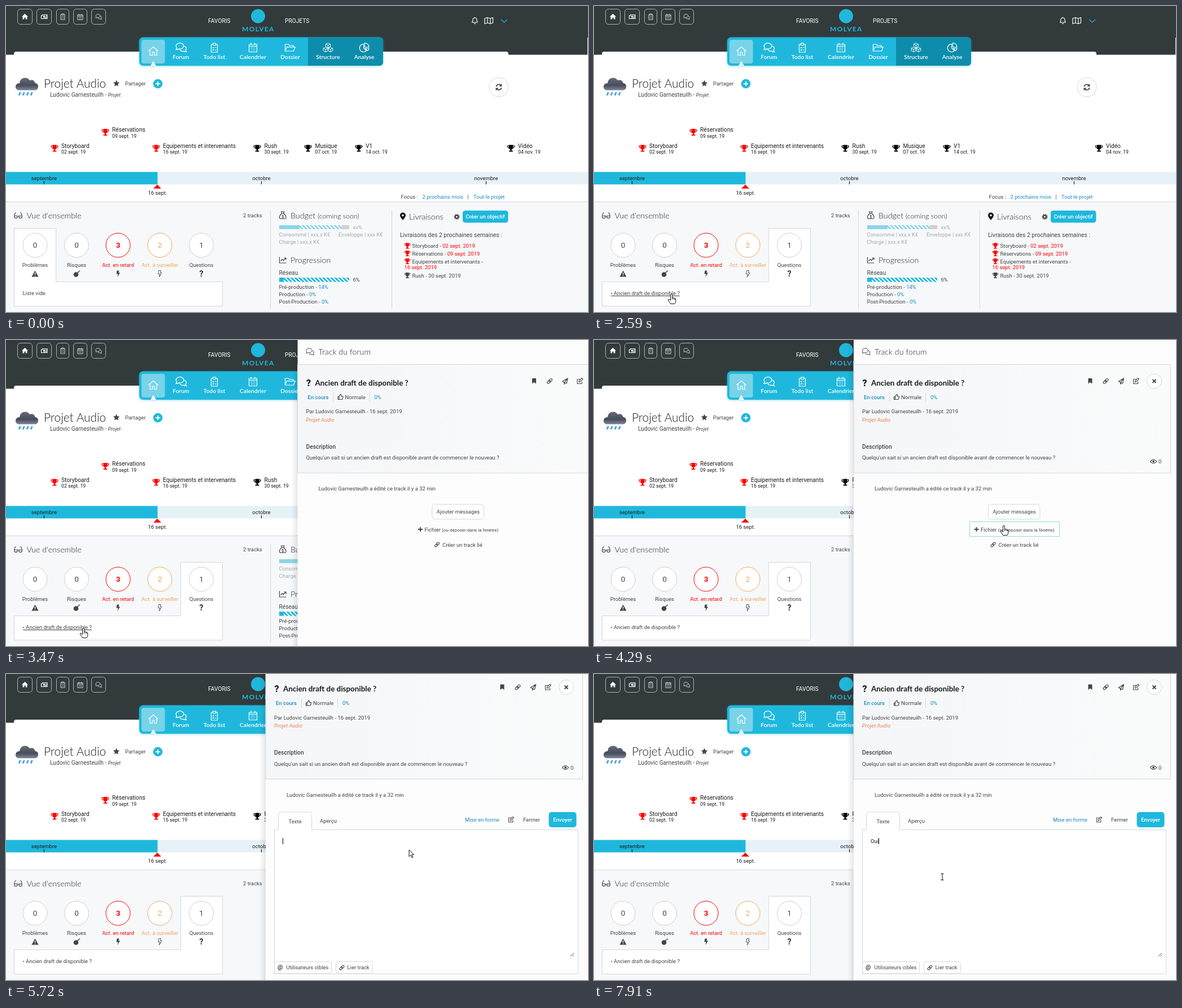
An HTML page that plays this animation: 1031 by 543 pixels, repeating every 8 s.

```html
<!DOCTYPE html>
<html lang="fr">
<head>
<meta charset="utf-8">
<title>Tableau de bord</title>
<style>
html, body { margin: 0; width: 100%; height: 100%; overflow: hidden; background: #fff; }
svg { display: block; }
.stage { font: 9.5px Roboto, sans-serif; fill: #444; color: #444; white-space: pre; }
.l { font-size: 10.2px; }
.s { font-size: 8.75px; }
.q { font: 300 14.3px Lato, sans-serif; fill: #222; }
.nav { font: 600 10.3px Lato, sans-serif; fill: #fff; color: #fff; text-anchor: middle; }
.m { text-anchor: middle; }
.med { font-weight: 500; }
.k { fill: #1c1c1c; color: #000; }
.b { fill: #1b8bbd; }
.c { fill: #1fb8dc; }
.r { fill: #f00; color: #f00; }
.o { fill: #f4a55a; color: #f4a55a; }
.g { fill: #aaa; }
.w { fill: #fff; color: #fff; }
.i { fill: none; stroke: currentColor; stroke-width: 1.2; stroke-linejoin: round; }
.f { fill: currentColor; stroke: none; }
.line { fill: none; stroke: #d3d8db; }
.white { fill: #fff; stroke: #d3d8db; }
.hover { fill: none; stroke: #8fd8ea; }
.menu { filter: drop-shadow(0 1px 2px rgba(31, 184, 220, .45)); }

/* visibility switches; positions in percent of the 8 s loop */
.v { animation: 8s step-end infinite; }
@keyframes tabA { 0% { visibility: visible } 18.75%, 100% { visibility: hidden } }
@keyframes tabB { 0% { visibility: hidden } 18.75%, 100% { visibility: visible } }
@keyframes ring { 0% { visibility: hidden } 12.75% { visibility: visible } 23.1%, 100% { visibility: hidden } }
@keyframes under { 0% { visibility: hidden } 30.25% { visibility: visible } 44%, 100% { visibility: hidden } }
@keyframes file { 0% { visibility: hidden } 51.6% { visibility: visible } 59%, 100% { visibility: hidden } }
@keyframes add { 0% { visibility: hidden } 60% { visibility: visible } 66.5%, 100% { visibility: hidden } }
@keyframes actions { 0% { visibility: visible } 66.5%, 100% { visibility: hidden } }
@keyframes editor { 0% { visibility: hidden } 66.5%, 100% { visibility: visible } }
@keyframes caret {
  0% { visibility: hidden; transform: none }
  66.5% { visibility: visible }
  73.5% { visibility: hidden }
  79.25% { visibility: visible }
  85.85% { visibility: hidden; transform: none }
  91.1% { visibility: visible; transform: translateX(7px) }
  96.85% { visibility: visible; transform: translateX(12px) }
  98.85%, 100% { visibility: visible; transform: translateX(14px) }
}
@keyframes key1 { 0% { visibility: hidden } 91.1%, 100% { visibility: visible } }
@keyframes key2 { 0% { visibility: hidden } 96.85%, 100% { visibility: visible } }
@keyframes key3 { 0% { visibility: hidden } 98.85%, 100% { visibility: visible } }
@keyframes arrow {
  0% { visibility: visible } 12.75% { visibility: hidden }
  23.1% { visibility: visible } 30.25% { visibility: hidden }
  44% { visibility: visible } 51.6% { visibility: hidden }
  66.5% { visibility: visible } 72%, 100% { visibility: hidden }
}
@keyframes hand {
  0% { visibility: hidden } 12.75% { visibility: visible }
  23.1% { visibility: hidden } 30.25% { visibility: visible }
  44% { visibility: hidden } 51.6% { visibility: visible }
  66.5%, 100% { visibility: hidden }
}
@keyframes beam { 0% { visibility: hidden } 72%, 100% { visibility: visible } }

.panel { animation: slide 8s linear infinite; }
@keyframes slide {
  0%, 37.4% { transform: translateX(600px) }
  37.415% { transform: translateX(571px); animation-timing-function: cubic-bezier(.37, 0, .63, 1) }
  44.93%, 100% { transform: none }
}
.scroll { animation: scroll 8s ease-in-out infinite; }
@keyframes scroll {
  0%, 66.5% { transform: none }
  71%, 100% { transform: translateY(-49.5px) }
}
.cursor { animation: move 8s linear infinite; }
@keyframes move {
  0%, 3.8% { transform: translate(852px, 560px) }
  3.85% { transform: translate(852px, 533px); animation-timing-function: ease-in-out }
  13.6% { transform: translate(328px, 420px) }
  17%, 22.3% { transform: translate(336px, 417px); animation-timing-function: ease-in-out }
  30.6% { transform: translate(133px, 502px) }
  32.3% { transform: translate(137px, 511px) }
  43.5% { transform: translate(137px, 511px); animation-timing-function: ease-in }
  47.2% { transform: translate(418px, 446px) }
  51.5% { transform: translate(700px, 338px) }
  53.6%, 58.1% { transform: translate(726px, 329px) }
  64.5%, 72% { transform: translate(714px, 312px); animation-timing-function: ease-in-out }
  75.9%, 77.6% { transform: translate(617px, 362px) }
  81%, 100% { transform: translate(617px, 360px) }
}
</style>
</head>
<body>
<svg class="stage" width="1031" height="543" viewBox="0 0 1031 543">
<defs>
  <g id="trophy"><path class="f" d="M-3.5-6H3.5V-1A3.5 3.5 0 0 1 1 2.3V4H3.3V6H-3.3V4H-1V2.3A3.5 3.5 0 0 1-3.5-1Z"/><path class="i" d="M-3.5-4.4H-6Q-6-.4-2.8-.3M3.5-4.4H6Q6-.4 2.8-.3" stroke-width="1.4"/></g>
  <path id="house" class="i" d="M-8.5 0L0-7.5L8.5 0M-6-2V7.5H-1.8V2H1.8V7.5H6V-2"/>
  <path id="chat" class="i" d="M-8.3 3.4Q-6.6 2-6.8.6A6.2 4.8 0 1 1-3.2 2.4Q-5.2 3.6-8.3 3.4ZM5.2-2.2Q9.6 0 8.3 3Q7.9 4.2 7 4.8Q7.4 6.3 8.9 7.2Q5.8 7.2 4.2 6Q0 6.8-2 4"/>
  <path id="clip" class="i" d="M-2.5-6H-5.5V8H5.5V-6H2.5M-2.5-7.8H2.5V-4.5H-2.5ZM-3-.5l1 1 1.5-2M1-.5H3.5M-3 3.5l1 1 1.5-2M1 4H3.5"/>
  <path id="cal" class="i" d="M-7-6H7V7.5H-7ZM-7-2.6H7M-3.5-8.5V-5M3.5-8.5V-5M-4 .5h2M-1 .5h2M2 .5h2M-4 4h2M-1 4h2M2 4h2"/>
  <path id="folder" class="i" d="M-8.5 6V-6H-3L-1-4H6V-1.2M-8.5 6L-5.5-1.2H9.3L6.3 6Z"/>
  <path id="cube" class="i" stroke-linecap="round" style="stroke-width: .9" d="M0-4L4-2.2V2L0 4L-4 2V-2.2ZM-4-2.2L0-.4L4-2.2M0-.4V4"/>
  <path id="pie" class="i" d="M-1-6.5A7 7 0 1 0 4 5.2L-1 .5ZM1-8.5A7.5 7.5 0 0 1 8.5-1H1ZM2 1H8.5Q8.4 4 6 5.5Z"/>
  <g id="link" class="i"><rect x="-5.5" y="-2" width="6.5" height="4" rx="2" transform="rotate(-45)"/><rect x="-1" y="-2" width="6.5" height="4" rx="2" transform="rotate(-45)"/></g>
  <path id="edit" class="i" d="M1-3.7H-5V5H4V1M-2 2L-1.4-.6L4-6L6-4L.6 1.4Z"/>
  <path id="bolt" d="M-2-5.5H2L.8-1.8H3.5L-1 6L0 .5H-3Z"/>
  <path id="plus" class="i" style="stroke-width: 1.9" d="M-4 0H4M0-4V4"/>
  <pattern id="hatch" width="5" height="5" patternUnits="userSpaceOnUse" patternTransform="rotate(-45)"><rect width="5" height="5" fill="#fff"/><rect width="3" height="5" fill="#1fb8dc"/></pattern>
  <pattern id="pale" width="5" height="5" patternUnits="userSpaceOnUse" patternTransform="rotate(-45)"><rect width="5" height="5" fill="#fff"/><rect width="3" height="5" fill="#8dd4ea"/></pattern>
  <linearGradient id="card"><stop stop-color="#f4f6f8"/><stop offset="1" stop-color="#fafbfb"/></linearGradient>
  <linearGradient id="shade"><stop stop-opacity="0"/><stop offset="1" stop-opacity=".1"/></linearGradient>
  <linearGradient id="sky" x2="0" y2="1"><stop stop-color="#686c7a"/><stop offset=".6" stop-color="#484c5b"/><stop offset="1" stop-color="#7f879d"/></linearGradient>
</defs>

<rect width="1031" height="543" fill="#fff"/>

<!-- top bar -->
<path fill="#323a3c" d="M0 0H1031V86.5H890V85Q890 81 886 81H18Q14 81 14 85V86.5H0Z"/>
<path fill="#fff" d="M1030 56h1v31h-1z"/>
<g fill="none" stroke="#b0b5b6">
  <rect x="20.5" y="5.5" width="26" height="27" rx="5"/>
  <rect x="54.5" y="5.5" width="26" height="27" rx="5"/>
  <rect x="89.5" y="5.5" width="22" height="27" rx="5"/>
  <rect x="119.5" y="5.5" width="24" height="27" rx="5"/>
  <rect x="151.5" y="5.5" width="25" height="27" rx="5"/>
</g>
<g class="w">
  <path class="f" d="M28 19L33.5 13.8L39 19H37.5V23.5H34.7V20.5H32.3V23.5H29.5V19Z"/>
  <path class="i" d="M64.5 15.5H73V22.5H62.5V17H64.5ZM66.5 17.5h2v2h-2zM70 17.5h2M70 19.5h2M66 21h6"/>
  <use href="#clip" transform="translate(100.5 19) scale(.65)"/>
  <use href="#cal" transform="translate(131.5 19.5) scale(.65)"/>
  <use href="#chat" transform="translate(164 19) scale(.62)"/>
  <path class="i" d="M825.5 29Q827 27.5 827 24.5Q827 21 830.5 21Q834 21 834 24.5Q834 27.5 835.5 29ZM829 30.5Q830.5 32.5 832 30.5M830.5 19.5V21"/>
  <path class="i" d="M848 22L853 20.5L858 22L862.5 20.5V30L858 31.5L853 30L848 31.5ZM853 20.5V30M858 22V31.5"/>
  <text class="l" x="358" y="30">FAVORIS</text>
  <text class="l" x="494" y="30">PROJETS</text>
</g>
<path d="M877 24L882.5 29L888 24" fill="none" stroke="#1fa8dc" stroke-width="1.4"/>
<circle class="c" cx="446.5" cy="18" r="12.5"/>
<text class="c" x="418" y="45" style="font: 700 12px Lato, sans-serif; letter-spacing: 1.3px">MOLVEA</text>

<!-- project menu -->
<g class="menu">
  <rect class="c" x="236" y="55.5" width="432" height="50.5" rx="7"/>
  <path fill="#0d8dab" d="M535 55.5H661Q668 55.5 668 62.5V99Q668 106 661 106H535Z"/>
</g>
<rect x="240" y="60" width="41.5" height="42" rx="4" fill="#78d3e9"/>
<path fill="#fff" d="M256 106L261 98L266 106Z"/>
<g class="nav">
  <use href="#house" x="261" y="80"/>
  <use href="#chat" transform="translate(310 73.5) scale(1.1)"/><text x="310" y="94">Forum</text>
  <use href="#clip" x="369" y="74"/><text x="369" y="94">Todo list</text>
  <use href="#cal" x="437.5" y="74"/><text x="437.5" y="94">Calendrier</text>
  <use href="#folder" x="503" y="74"/><text x="503.5" y="94">Dossier</text>
  <use href="#cube" x="570.5" y="70"/><use href="#cube" x="566.2" y="77.5"/><use href="#cube" x="574.8" y="77.5"/><text x="570.5" y="94">Structure</text>
  <use href="#pie" x="634.5" y="74"/><text x="634.5" y="94">Analyse</text>
</g>

<!-- project heading -->
<path fill="url(#sky)" d="M22 149.5Q16.5 148 17 142.5Q18 137 24 137Q25 128 33 127.5Q39 127 42 132Q49 129 51.5 136.5Q57.5 138 57 143.5Q56.5 148.5 52 149.5Z"/>
<path stroke="#3f9fdc" stroke-width="2.8" stroke-linecap="round" d="M25 154l-1.6 3.5M32 154l-1.6 3.5M39 154l-1.6 3.5M46 154l-1.6 3.5"/>
<text class="q k" x="67" y="145" style="font-size: 20.8px">Projet Audio</text>
<path d="M195.5 131.5l1.7 3.7 4 .5-3 2.7.8 4-3.5-2-3.5 2 .8-4-3-2.7 4-.5z"/>
<text x="211" y="141">Partager</text>
<circle class="c" cx="269" cy="138" r="8.3"/>
<use class="w" href="#plus" x="269" y="138"/>
<text class="l" x="78" y="160.5">Ludovic Garnesteuilh - <tspan class="s" font-style="italic">Projet</tspan></text>
<circle class="white" cx="873" cy="144" r="17"/>
<path class="i" style="stroke-width: 1.7" d="M868.3 143A4.8 4.8 0 0 1 877 141.3M877.7 145A4.8 4.8 0 0 1 869 146.7M877.6 138.5V142H874M868.4 149.5V146H872"/>

<!-- milestones -->
<g class="r"><use href="#trophy" x="86" y="252.5"/><use href="#trophy" x="176" y="224"/><use href="#trophy" x="266" y="252.5"/></g>
<g class="k">
  <use href="#trophy" x="445" y="252.5"/><use href="#trophy" x="535" y="252.5"/><use href="#trophy" x="625" y="252.5"/><use href="#trophy" x="894.5" y="252.5"/>
  <g class="l">
    <text x="98" y="251.5">Storyboard</text><text x="188" y="223">Réservations</text><text x="278" y="251.5">Equipements et intervenants</text>
    <text x="457.5" y="251.5">Rush</text><text x="547.5" y="251.5">Musique</text><text x="637" y="251.5">V1</text><text x="907" y="251.5">Vidéo</text>
  </g>
  <g class="s">
    <text x="98" y="262">02 sept. 19</text><text x="188" y="234">09 sept. 19</text><text x="278" y="262">16 sept. 19</text>
    <text x="457.5" y="262">30 sept. 19</text><text x="547.5" y="262">07 oct. 19</text><text x="637" y="262">14 oct. 19</text><text x="907" y="262">04 nov. 19</text>
  </g>
</g>
<rect y="294.5" width="1031" height="22" fill="#e7f1f8"/>
<rect class="c" y="294.5" width="268.5" height="22"/>
<g class="k m">
  <text x="67.5" y="309">septembre</text><text x="452.5" y="309">octobre</text><text x="850.5" y="309">novembre</text>
  <path stroke="#000" d="M67.5 311V316.5M452.5 311V316.5M850.5 311V316.5"/>
  <text x="268.5" y="334.5">16 sept.</text>
</g>
<path class="r" d="M261 324L268 317L275 324Z"/>
<text x="699.5" y="342">Focus :</text><text class="b" x="737.5" y="342">2 prochains mois</text><text x="817.5" y="342">|</text><text class="b" x="828" y="342">Tout le projet</text>

<!-- overview -->
<rect y="348" width="1031" height="195" fill="#f6f8fa"/>
<path class="line" d="M0 347.5H1031M468.5 363V537M683.5 363V537"/>
<path class="i" d="M14.8 373Q15 367 18 366.5M28.2 373Q28 367 25 366.5M20.3 373H22.7M14.8 372.5h5.3v2q0 2-2.6 2t-2.7-2zM22.9 372.5h5.3v2q0 2-2.6 2t-2.7-2z"/>
<text class="q" x="36.5" y="376.5">Vue d'ensemble</text>
<text x="420" y="375">2 tracks</text>
<path class="white v" style="animation-name: tabA" d="M14.5 532.5V394.5H88.5V489.5H383.5V532.5Z"/>
<path class="white v" style="animation-name: tabB" d="M14.5 489.5H309.5V394.5H383.5V532.5H14.5Z"/>
<g fill="#fff" stroke="#cfcfcf">
  <circle cx="51.5" cy="424.5" r="21.5"/><circle cx="125" cy="424.5" r="21.5"/><circle cx="346" cy="424.5" r="21.5"/>
  <circle cx="198.5" cy="424.5" r="21.5" stroke="#f00"/><circle cx="272.5" cy="424.5" r="21.5" stroke="#f4a55a"/>
</g>
<circle class="v" cx="346" cy="424.5" r="21.5" fill="none" stroke="#5cc4de" style="animation-name: ring"/>
<g class="m" font-size="13.5">
  <text x="51.5" y="429">0</text><text x="125" y="429">0</text><text class="r" x="198.5" y="429" font-weight="700">3</text><text class="o" x="272.5" y="429">2</text><text x="346" y="429">1</text>
</g>
<g class="m">
  <text x="51.5" y="463">Problèmes</text><text x="125" y="463">Risques</text><text class="r" x="198.5" y="463">Act. en retard</text><text class="o" x="272.5" y="463">Act. à surveiller</text><text x="346" y="463">Questions</text>
</g>
<path d="M51.5 469.5L57.5 480.5H45.5Z"/><path d="M51.5 473V477M51.5 478V479.3" stroke="#fff" stroke-width="1.3"/>
<circle cx="124" cy="476.5" r="4.3"/><path class="i" style="stroke-width: 1.7" d="M126 474L128.5 471.5M128.5 470.5h2.5"/>
<use href="#bolt" x="198.5" y="475"/>
<use href="#bolt" class="i" x="272.5" y="475" style="stroke-width: .9"/>
<text class="m" x="346" y="480" font-size="14" font-weight="900">?</text>
<text class="v" x="29.5" y="513" style="animation-name: tabA">Liste vide</text>
<text class="v" x="29.5" y="513" style="animation-name: tabB">• Ancien draft de disponible ?</text>
<path class="v" d="M30 514.5H152" stroke="#444" style="animation-name: under"/>

<!-- budget and progress -->
<path class="i" d="M487.5 365H493L491.8 368H488.7ZM488.7 368Q484 372 484.5 376Q485 377.5 487 377.5H493.5Q495.7 377.5 496 376Q496.5 372 491.8 368"/>
<text class="m" x="490.3" y="376" font-size="7" font-weight="700">$</text>
<text class="q" x="504" y="376.5">Budget <tspan font-size="12.4">(coming soon)</tspan></text>
<path fill="#8dd4ea" d="M484 389H520V396H484Z"/><path fill="url(#pale)" d="M520 389H595V396H520Z"/><path fill="#d0d0d0" d="M595 389H608V396H595Z"/>
<g class="g"><text x="614.5" y="396">xx%</text><text x="483.5" y="409">Consommé | xxx.x K€</text><text x="589" y="409">Enveloppe | xxx K€</text><text x="483.5" y="422">Charge | xxx.x K€</text></g>
<path class="i" d="M484.5 445.5V456H496.5M486.5 452.5L489.5 449.5L491.5 451.5L495.5 447.5M492.5 447H496V450.5"/>
<text class="q" x="504" y="456">Progression</text>
<text class="l" x="483.5" y="477">Réseau</text>
<path class="c" d="M484 482H492V489.5H484Z"/><path fill="url(#hatch)" d="M492 482H608V489.5H492Z"/>
<text x="614.5" y="489">6%</text>
<text x="483.5" y="502">Pré-production - <tspan class="b">14%</tspan></text>
<text x="483.5" y="515">Production - <tspan class="b">0%</tspan></text>
<text x="483.5" y="528">Post-Production - <tspan class="b">0%</tspan></text>

<!-- deliveries -->
<path fill="#111" fill-rule="evenodd" d="M703 380Q698 374 698 371.5A5 5 0 0 1 708 371.5Q708 374 703 380ZM703 369.7a1.8 1.8 0 1 0 .01 0Z"/>
<text class="q" x="714" y="378.5">Livraisons</text>
<g class="i"><circle cx="798.5" cy="374" r="2.7" stroke-width="2.2"/><circle cx="798.5" cy="374" r="4.3" stroke-width="1.6" stroke-dasharray="1.7 1.677"/></g>
<rect class="c" x="809" y="363" width="80.5" height="21.5" rx="4.5"/>
<text class="w m med" x="849" y="377" font-size="9.3">Créer un objectif</text>
<text x="698" y="409.5" font-size="10.4">Livraisons des 2 prochaines semaines :</text>
<g class="r"><use href="#trophy" transform="translate(711 425.5) scale(.82)"/><use href="#trophy" transform="translate(711 439) scale(.82)"/><use href="#trophy" transform="translate(711 453) scale(.82)"/></g>
<use href="#trophy" transform="translate(711 478) scale(.82)"/>
<text x="719.5" y="429">Storyboard - <tspan class="r">02 sept. 2019</tspan></text>
<text x="719.5" y="442.5">Réservations - <tspan class="r">09 sept. 2019</tspan></text>
<text x="719.5" y="456.5">Equipements et intervenants -</text>
<text class="r" x="705.5" y="467">16 sept. 2019</text>
<text x="719.5" y="481.5">Rush - 30 sept. 2019</text>

<!-- side panel -->
<g class="panel">
  <rect x="449" width="11" height="543" fill="url(#shade)"/>
  <rect x="460" width="600" height="543" fill="#fdfdfd"/>
  <g class="scroll">
    <use href="#chat" transform="translate(482 20.5) scale(.82)"/>
    <text class="q" x="497" y="25.5">Track du forum</text>
    <path d="M460 43.5H1021.5V236H460Z" fill="url(#card)" stroke="#d3d8db"/>
    <text x="475.5" y="81.5" class="k" font-size="16" font-weight="900">?</text>
    <text class="k" x="491" y="80.5" style="font: 700 13.4px Lato, sans-serif">Ancien draft de disponible ?</text>
    <path d="M875.5 68H882.5V77.5L879 75L875.5 77.5Z"/>
    <use href="#link" x="906.5" y="73"/>
    <path class="i" d="M929 73.5L938.5 68L936.5 77L932.5 75.3L938.5 68M929 73.5L932.5 75.3V78.5L934.3 76"/>
    <use href="#edit" transform="translate(960 73) scale(.9)"/>
    <circle class="white" cx="992.5" cy="73" r="13"/>
    <path class="i" style="stroke-width: 1.9" d="M989.5 70L995.5 76M995.5 70L989.5 76"/>
    <text class="b med" x="478" y="104.5">En cours</text>
    <path class="line" d="M523.5 93V109.5M587.5 93V109.5"/>
    <path class="i" d="M531.5 100.5H533.5V105.5H531.5ZM533.5 100.5L536 96.5Q538 96.5 537.5 100H540.5Q540.5 103.5 539 105.5H533.5"/>
    <text x="544" y="104.5">Normale</text><text class="b" x="596" y="104.5">0%</text>
    <text x="475" y="130">Par Ludovic Garnesteuilh - 16 sept. 2019</text>
    <text x="475" y="144.5" font-style="italic" fill="#ec8455">Projet Audio</text>
    <text class="med" x="475" y="192.5" font-size="10.3">Description</text>
    <text x="475" y="212">Quelqu'un sait si un ancien draft est disponible avant de commencer le nouveau ?</text>
    <path class="i" d="M985.5 215.5Q991 208.5 996.5 215.5Q991 222.5 985.5 215.5Z"/><circle cx="991" cy="215.5" r="2"/>
    <text x="1000" y="219">0</text>
    <text x="497" y="267">Ludovic Garnesteuilh a édité ce track il y a 32 min</text>

    <g class="v" style="animation-name: actions">
      <rect class="white" x="698.5" y="291.5" width="91.5" height="26.5" rx="4.5"/>
      <text class="m" x="744.5" y="308">Ajouter messages</text>
      <use href="#plus" x="677.5" y="336"/>
      <text x="685" y="339.5">Fichier <tspan font-size="8">(ou déposer dans la fenêtre)</tspan></text>
      <use href="#link" transform="translate(707 363) scale(.9)"/>
      <text x="716.5" y="366.5">Créer un track lié</text>
    </g>
    <rect class="hover v" x="665.5" y="322.5" width="159" height="26" style="animation-name: file"/>
    <rect class="hover v" x="698.5" y="291.5" width="91.5" height="26.5" rx="4.5" style="animation-name: add"/>

    <g class="v" style="animation-name: editor">
      <g transform="translate(0 49.5)">
        <path class="white" d="M475.5 276.5H482.5V249Q482.5 245 486.5 245H538Q541.5 245 541.5 249V276.5H1013.5V532H475.5Z"/>
        <text class="m" x="512" y="265">Texte</text><text x="556" y="264">Aperçu</text>
        <text class="b" x="813" y="262">Mise en forme</text>
        <use href="#edit" transform="translate(894.5 258.5) scale(.85)"/>
        <text x="916" y="262">Fermer</text>
        <rect class="c" x="961.5" y="245" width="49" height="27" rx="5"/>
        <text class="w m med" x="986" y="262">Envoyer</text>
        <text class="k" x="490" y="299.5"><tspan class="v" style="animation-name: key1">O</tspan><tspan class="v" style="animation-name: key2">u</tspan><tspan class="v" style="animation-name: key3">i</tspan></text>
        <path class="v" d="M490.5 291V302" stroke="#000" style="animation-name: caret"/>
        <path class="i" style="stroke-width: .9" d="M1000 501L1006 495M1003.5 501L1006 498.5"/>
        <rect class="white" x="475.5" y="510.5" width="101" height="21" rx="4"/>
        <rect class="white" x="584.5" y="510.5" width="65" height="21" rx="4"/>
        <text x="481" y="524" font-weight="700" font-size="10.5">@</text><text x="496.5" y="524">Utilisateurs cibles</text>
        <use href="#link" transform="translate(595 521) scale(.9)"/><text x="604.5" y="524">Lier track</text>
      </g>
    </g>
  </g>
</g>

<!-- pointer -->
<g class="cursor" fill="#fff" stroke="#111" stroke-linejoin="round">
  <path class="v" style="animation-name: arrow" d="M0 0V12L3 9.3L5 14L7 13.2L5 8.6H8.7Z"/>
  <path class="v" style="animation-name: hand" d="M-1.5 1Q0-.8 1.5 1V6.5Q3.5 5.6 4 7.2Q6 6.7 6.2 8.2Q7.8 8 7.8 10V13Q7.6 15.5 6 17.5H-1.5Q-3.5 14-5.7 11Q-6 9-4 9.5L-1.5 11.5ZM1.5 6.5V9.5M4 7.2V9.8M6.2 8.2V10"/>
  <path class="v" style="animation-name: beam" d="M-2.5-5.5H2.5M0-5.5V5.5M-2.5 5.5H2.5"/>
</g>
</svg>
</body>
</html>
```
